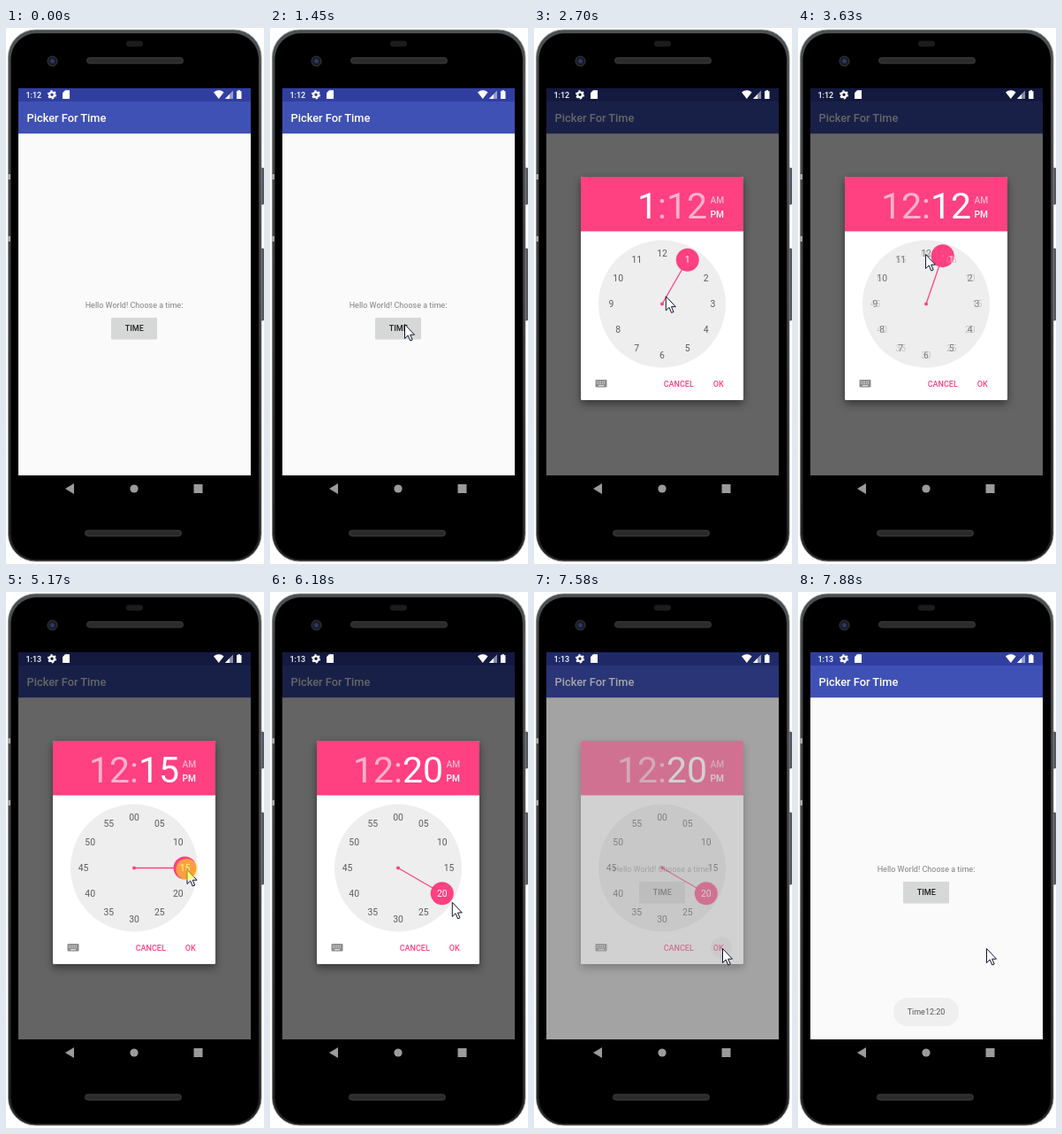
Animation of 292 by 605 pixels, one loop 8 s. Source, as an HTML page:

```html
<!DOCTYPE html>
<html lang="en">
<head>
<meta charset="utf-8">
<title>Time picker</title>
<style>
  html, body { margin: 0; width: 100%; height: 100%; overflow: hidden; background: #fff; }
  svg { display: block; width: 100%; height: 100%; font: 9px Roboto, sans-serif; }
  .m { font-weight: 500; }
  .c { text-anchor: middle; }
  .big { font-size: 41px; }
  .num { font-size: 10.4px; text-anchor: middle; }
</style>
</head>
<body>
<svg viewBox="0 0 292 605">
  <defs>
    <linearGradient id="edge" x2="0" y2="1">
      <stop offset="0" stop-color="#4c5052"/><stop offset=".5" stop-color="#3a3c3e"/><stop offset="1" stop-color="#222"/>
    </linearGradient>
    <clipPath id="knobClip"><circle id="clipDot" r="13"/></clipPath>
    <clipPath id="screen"><rect x="14" y="68" width="263" height="437"/></clipPath>
  </defs>

  <!-- phone -->
  <g fill="#55585a" stroke="#222" stroke-width=".6">
    <rect x="287" y="158" width="4.6" height="41" rx="1"/>
    <rect x="287" y="249" width="4.6" height="81" rx="1"/>
  </g>
  <rect x="2.5" y="2" width="286.5" height="600" rx="31" fill="url(#edge)" stroke="#8b8e90" stroke-width=".8"/>
  <rect x="5.5" y="6" width="280.5" height="594" rx="29" fill="#000"/>
  <path d="M2 165h3v6H2zM2 235h3v6H2z" fill="#aaa"/>
  <rect x="136" y="14.5" width="19" height="6.5" rx="3.2" fill="#1c1c1c"/>
  <g fill="#2b2b2b" stroke="#444" stroke-width=".8">
    <rect x="91.5" y="33.5" width="109" height="6.5" rx="3.2"/>
    <rect x="89.5" y="567" width="109" height="6.5" rx="3.2"/>
  </g>
  <circle cx="52.5" cy="37.5" r="5.5" fill="#1a1c24" stroke="#3a3c42"/>
  <circle cx="52.5" cy="37.5" r="2.4" fill="#30386e"/>
  <g fill="#9b9b9b">
    <path d="M67 520l10-6v12z"/><circle cx="145" cy="520" r="4.6"/><rect x="212.5" y="515" width="10" height="10"/>
  </g>

  <g clip-path="url(#screen)">
    <!-- app -->
    <rect x="14" y="68" width="263" height="437" fill="#fafafa"/>
    <rect x="14" y="119" width="263" height="1.2" fill="#000" opacity=".12"/>
    <rect x="14" y="68" width="263" height="51" fill="#3f51b5"/>
    <rect x="14" y="68" width="263" height="15" fill="#303f9f"/>
    <text x="23.5" y="105.7" class="m" font-size="12.8" fill="#fff">Picker For Time</text>
    <text x="145" y="315.6" class="c" fill="#808080">Hello World! Choose a time:</text>
    <rect x="119" y="328" width="52" height="23.6" rx="1.3" fill="#000" opacity=".15"/>
    <rect id="button" x="119" y="327" width="52" height="24" rx="1.3"/>
    <text x="145.3" y="342" class="m c" fill="#222">TIME</text>
    <g id="toast">
      <rect x="108" y="458" width="74" height="32" rx="16" fill="#efefef"/>
      <text id="toastText" x="145" y="477.3" class="c" fill="#555">Time12:20</text>
    </g>
    <rect id="dim" x="14" y="68" width="263" height="437"/>

    <!-- status bar -->
    <g fill="#fff">
      <text id="clock" x="22.5" y="79" class="m"></text>
      <g fill="none" stroke="#fff">
        <circle cx="52" cy="75.3" r="2.8" stroke-width="2.2"/>
        <circle cx="52" cy="75.3" r="4.3" stroke-width="1.6" stroke-dasharray="2.25"/>
      </g>
      <path d="M67 70.3h5v9.8h-8v-6.800z"/>
      <path d="M235 72.500q5.800-4.600 11.600 0l-5.800 7.500z"/>
      <path d="M248 80l9-9.500v9.500z" opacity=".5"/><path d="M248 80l5-5.300v5.300z"/>
      <path d="M261 71.200h1.600v-1h2.300v1h1.600v8.900h-5.500z"/>
    </g>

    <!-- dialog -->
    <g id="dialog">
      <rect x="53" y="168" width="184" height="252" rx="1.5" fill="#fff" style="filter:drop-shadow(0 4px 5px #0007)"/>
      <path d="M53 229.500v-60q0-1.500 1.500-1.500h181q1.500 0 1.500 1.500v60z" fill="#ff4081"/>
      <g fill="#fff">
        <text id="hour" x="140" y="215" class="big" text-anchor="end"></text>
        <text x="140" y="215" class="big" opacity=".6">:</text>
        <text id="minute" x="150" y="215" class="big"></text>
        <g class="m" font-size="10.2">
          <text x="199.500" y="197.500" opacity=".6">AM</text><text x="199.500" y="214">PM</text>
        </g>
      </g>
      <circle cx="145" cy="311.500" r="72" fill="#eee"/>
      <g fill="#5c5c5c"><g class="hours"></g><g class="minutes"></g></g>
      <line id="hand" x1="145" y1="311.500" stroke="#ff4081" stroke-width="1.300"/>
      <circle cx="145" cy="311.500" r="2" fill="#ff4081"/>
      <circle id="knob" r="13" fill="#ff4081"/>
      <circle id="speck" r=".9" fill="#fff"/>
      <g fill="#fff" clip-path="url(#knobClip)"><g class="hours"></g><g class="minutes"></g></g>
      <rect x="69.500" y="397" width="13" height="8.500" rx="1" fill="#8c8c8c"/>
      <path d="M71 399.200h10M71 401.200h10" stroke="#fff" stroke-width=".9" stroke-dasharray="1"/>
      <path d="M73 403.700h6" stroke="#fff" stroke-width=".9"/>
      <circle id="ripple" cx="212" cy="401.500" r="12" fill="#000" opacity=".05"/>
      <g class="m" fill="#ff4081">
        <text x="146.700" y="404.700">CANCEL</text><text x="202.800" y="404.700">OK</text>
      </g>
    </g>
  </g>

  <g id="pointer">
    <path d="M.5.5V16.500L4.200 13L6.800 19L9.200 18L6.700 12.200H11.500Z" fill="#fff" stroke="#10142c"/>
    <circle id="press" r="12" fill="#ff0" opacity=".5"/>
  </g>
</svg>

<script>
const LOOP = 8000, START = 300, TICK = 77.35;
const CX = 145, CY = 311.5, RADIUS = 57.5;
const $ = id => document.getElementById(id);
const set = (id, attrs) => { for (const a in attrs) $(id).setAttribute(a, attrs[a]); };
const show = (id, on) => set(id, { visibility: on ? 'visible' : 'hidden' });
const clamp = v => Math.max(0, Math.min(1, v));
const between = (k, a, b) => k >= a && k < b;
const onDial = deg => {
  const a = deg * Math.PI / 180;
  return [CX + RADIUS * Math.sin(a), CY - RADIUS * Math.cos(a)];
};

// pointer path: tick, x, y
const path = [
  [0, 251, 580], [10, 152, 334], [27, 152, 334], [37, 144, 255], [48, 144, 255],
  [53, 204, 295], [55, 204, 295], [57, 205, 293], [60, 205, 294], [63, 204.5, 313],
  [69, 205, 344], [75, 205, 344], [85, 213, 402], [200, 213, 402]
];
const pointerAt = k => {
  const i = Math.max(1, path.findIndex(p => p[0] > k));
  const [a, x, y] = path[i - 1], [b, x2, y2] = path[i];
  const u = clamp((k - a) / (b - a));
  return [x + (x2 - x) * u, y + (y2 - y) * u];
};

function fillDial(cls, label) {
  let html = '';
  for (let i = 0; i < 12; i++) {
    const [x, y] = onDial(i * 30);
    html += `<text class="num" x="${x}" y="${y + 3.7}">${label(i)}</text>`;
  }
  document.querySelectorAll(cls).forEach(g => g.innerHTML = html);
}
fillDial('.hours', i => i || 12);
fillDial('.minutes', i => String(i * 5).padStart(2, '0'));

// [dialog opacity, scale, dim] while opening and closing
const opening = [[.45, .96, .25], [1, 1, .49]];
const closing = [[.85, 1, .5], [.5, 1, .35], [.2, 1, .15]];
function dialogState(k) {
  if (k < 19 || k > 95) return [0, 1, 0];
  return opening[k - 19] || closing[k - 93] || [1, 1, .6];
}

function draw(now) {
  const k = Math.floor((now % LOOP - START) / TICK + .08);
  const time = START + k * TICK;
  const [px, py] = pointerAt(k);

  show('pointer', k >= 0);
  set('pointer', { transform: `translate(${px} ${py})` });
  const pressed = k === 12 || between(k, 38, 40) || between(k, 60, 73) || between(k, 90, 92);
  set('press', { opacity: pressed ? .5 : 0 });

  set('button', { fill: between(k, 15, 21) ? '#b8b9b9' : '#d6d7d7' });
  $('clock').textContent = k < 45 ? '1:12' : '1:13';
  set('toast', { opacity: k < 95 ? 0 : k < 96 ? .5 : 1 });
  set('toastText', { opacity: k < 98 ? .85 : 1 });

  const [alpha, scale, dim] = dialogState(k);
  set('dim', { opacity: dim });
  set('dialog', {
    opacity: alpha,
    transform: `translate(145 294) scale(${scale}) translate(-145 -294)`
  });
  if (!alpha) return;

  // hours fade to minutes while the hand sweeps
  const fade = (1 - Math.cos(Math.PI * clamp((time - 3461) / 480))) / 2;
  const dragging = k >= 60;
  const [dx, dy] = pointerAt(Math.min(k, 69));
  const minute = dragging ? Math.round(Math.atan2(dx - CX, CY - dy) * 30 / Math.PI) : 12;
  const angle = k < 39 ? 30 : dragging ? minute * 6 : 72 * fade;
  const [x, y] = onDial(angle);

  $('hour').textContent = k < 39 ? 1 : 12;
  $('minute').textContent = minute;
  set('hour', { opacity: k < 41 ? 1 : .6 });
  set('minute', { opacity: k < 41 ? .6 : 1 });
  document.querySelectorAll('.hours').forEach(g => g.setAttribute('opacity', 1 - fade));
  document.querySelectorAll('.minutes').forEach(g => g.setAttribute('opacity', fade));
  set('hand', { x2: x, y2: y });
  for (const id of ['knob', 'clipDot', 'speck']) set(id, { cx: x, cy: y });
  set('speck', { opacity: minute % 5 ? fade : 0 });
  set('ripple', { opacity: k >= 92 ? .05 : 0 });
}

function frame() {
  draw(performance.now());
  requestAnimationFrame(frame);
}
frame();
</script>
</body>
</html>
```
